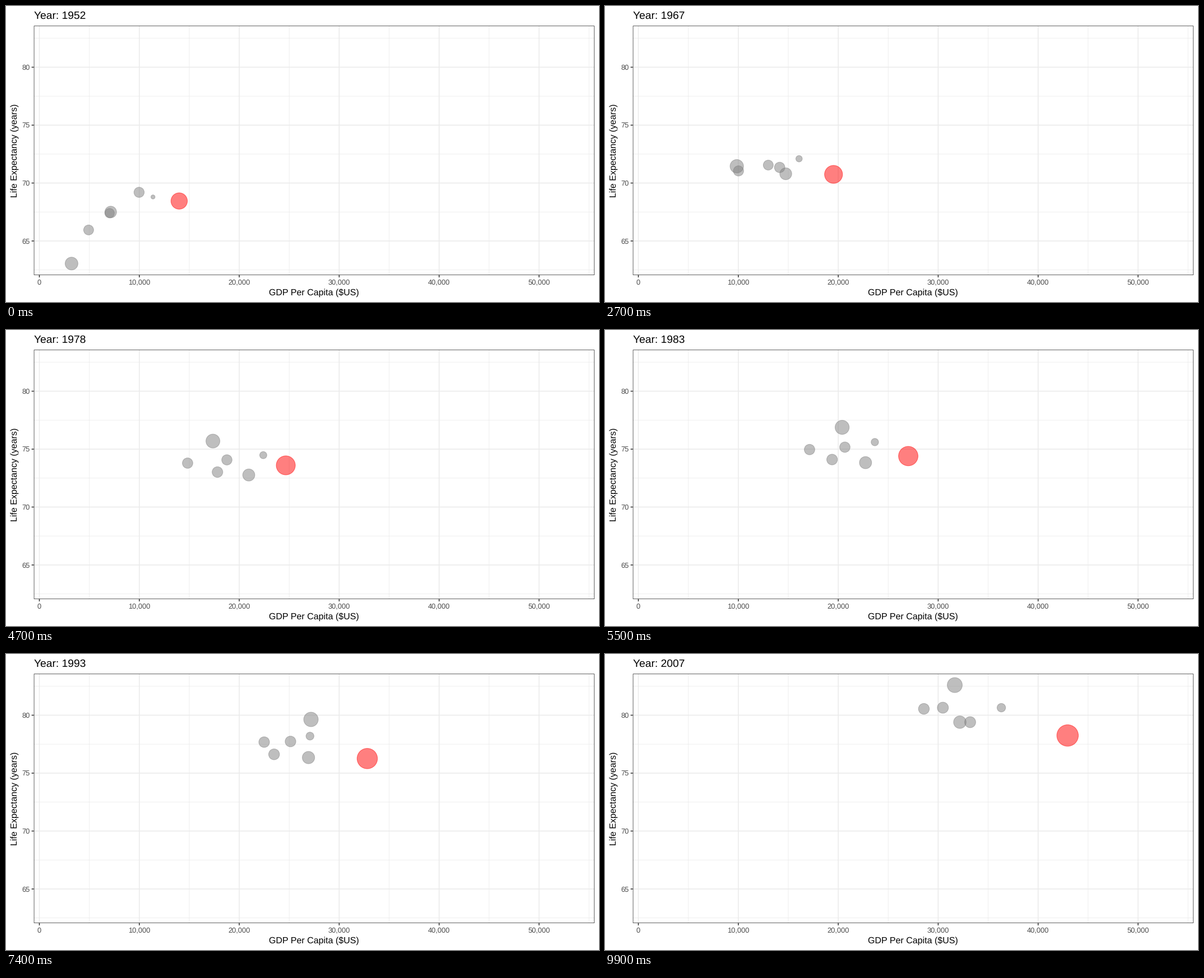
Write a matplotlib script that moves like this. It is 1058 px wide and 529 px high and loops after 10 s.

```python
import numpy as np
import matplotlib.pyplot as plt
from matplotlib.animation import FuncAnimation
from matplotlib.patches import Circle, Rectangle

W, H, DPI = 1058, 529, 100
FRAMES, STEP_MS = 100, 100
FIRST, LAST = 1952, 2007
LEFT, RIGHT, TOP, BOTTOM = 49.7, 1050.0, 35.3, 481.0
X_LIM = (-0.55, 55.55)  # thousand dollars
Y_LIM = (62.05, 83.58)
PX = 105 / 72  # pixels per typographic point
THICK = 1.556
GREY, RED = "#7f7f7f", "#ff0000"
SMALLEST, LARGEST = 14.8, 301.1  # population in millions

# Each bubble passes these years on straight legs
TURNS = [FIRST, 1967, 1977, 1992, LAST]


def to_x(gdp):
    return LEFT + (gdp - X_LIM[0]) / (X_LIM[1] - X_LIM[0]) * (RIGHT - LEFT)


def to_y(life):
    return BOTTOM - (life - Y_LIM[0]) / (Y_LIM[1] - Y_LIM[0]) * (BOTTOM - TOP)


def pts(px):
    return px * 72 / DPI


class Bubble:
    """A country whose wealth and health move from key point to key point."""

    def __init__(self, color, pop, gdp, life):
        self.pop, self.gdp, self.life = pop, gdp, life
        self.dot = Circle((0, 0), 1, fc=color, ec=color, alpha=0.5,
                          lw=pts(1.03), zorder=4)

    def move(self, year):
        pop = np.interp(year, [FIRST, LAST], self.pop)
        share = (pop - SMALLEST) / (LARGEST - SMALLEST)
        size = 2 + 10 * np.sqrt(max(share, 0))
        self.dot.set_radius(0.375 * PX * (size * 2.845 + 0.945))
        self.dot.center = (to_x(np.interp(year, TURNS, self.gdp)),
                           to_y(np.interp(year, TURNS, self.life)))


bubbles = [
    Bubble(GREY, (14.8, 33.4), (11.37, 16.08, 22.09, 26.34, 36.32),
           (68.8, 72.1, 74.2, 78.0, 80.65)),
    Bubble(GREY, (42.5, 61.1), (7.03, 13.0, 18.29, 24.7, 30.47),
           (67.4, 71.55, 73.8, 77.5, 80.65)),
    Bubble(GREY, (69.1, 82.4), (7.14, 14.75, 20.51, 26.51, 32.17),
           (67.5, 70.8, 72.5, 76.1, 79.4)),
    Bubble(GREY, (47.7, 58.1), (4.93, 10.02, 14.26, 22.01, 28.57),
           (65.95, 71.05, 73.5, 77.45, 80.55)),
    Bubble(GREY, (86.5, 127.5), (3.22, 9.85, 16.61, 26.82, 31.66),
           (63.05, 71.45, 75.4, 79.4, 82.6)),
    Bubble(GREY, (50.4, 60.8), (9.98, 14.14, 17.43, 22.71, 33.2),
           (69.2, 71.35, 72.75, 76.4, 79.4)),
    Bubble(RED, (157.6, 301.1), (13.99, 19.53, 24.07, 32.0, 42.95),
           (68.45, 70.75, 73.4, 76.1, 78.25)),
]

plt.rcParams["font.family"] = "Liberation Sans"
plt.rcParams["text.hinting"] = "no_hinting"
fig = plt.figure(figsize=(W / DPI, H / DPI), dpi=DPI, facecolor="white")
ax = fig.add_axes([0, 0, 1, 1])
ax.set_xlim(0, W)
ax.set_ylim(H, 0)
ax.axis("off")


def line(xs, ys, color, width, z):
    ax.plot(xs, ys, color=color, lw=pts(width), solid_capstyle="butt",
            snap=False, zorder=z)


def label(x, y, text, size, color="black", ha="center", **kw):
    return ax.text(x, y, text, fontsize=pts(size * PX), color=color,
                   ha=ha, va="baseline", zorder=6, **kw)


def grid(xs, ys, width, z):
    for v in xs:
        line([to_x(v)] * 2, [TOP, BOTTOM], "#ebebeb", width, z)
    for v in ys:
        line([LEFT, RIGHT], [to_y(v)] * 2, "#ebebeb", width, z)


x_ticks = range(0, 51, 10)
y_ticks = range(65, 81, 5)
grid(range(5, 56, 10), np.arange(62.5, 83, 5), THICK / 2, 1)
grid(x_ticks, y_ticks, THICK, 2)

for v in x_ticks:
    line([to_x(v)] * 2, [BOTTOM, BOTTOM + 4], "#333333", THICK, 5)
    label(to_x(v), 497.4, f"{v * 1000:,}", 8.8, "#4d4d4d")
for v in y_ticks:
    line([LEFT - 4, LEFT], [to_y(v)] * 2, "#333333", THICK, 5)
    label(42.5, to_y(v) + 4.5, str(v), 8.8, "#4d4d4d", ha="right")

inset = THICK / 4
ax.add_patch(Rectangle((LEFT + inset, TOP + inset),
                       RIGHT - LEFT - 2 * inset, BOTTOM - TOP - 2 * inset,
                       fill=False, ec="#333333", lw=pts(THICK / 2),
                       snap=False, zorder=5))

label((LEFT + RIGHT) / 2, 517.5, r"GDP Per Capita (\$US)", 11)
label(20, (TOP + BOTTOM) / 2, "Life Expectancy (years)", 11,
      rotation=90, rotation_mode="anchor")
title = label(LEFT, 22.4, "", 13.2, ha="left")

for bubble in bubbles:
    ax.add_patch(bubble.dot)


def update(frame):
    year = FIRST + (LAST - FIRST) * frame / (FRAMES - 1)
    title.set_text(f"Year: {round(year)}")
    for bubble in bubbles:
        bubble.move(year)
    return [title, *(b.dot for b in bubbles)]


anim = FuncAnimation(fig, update, frames=FRAMES, interval=STEP_MS,
                     init_func=lambda: update(0), repeat=True,
                     repeat_delay=0, blit=False)
plt.show()
```
